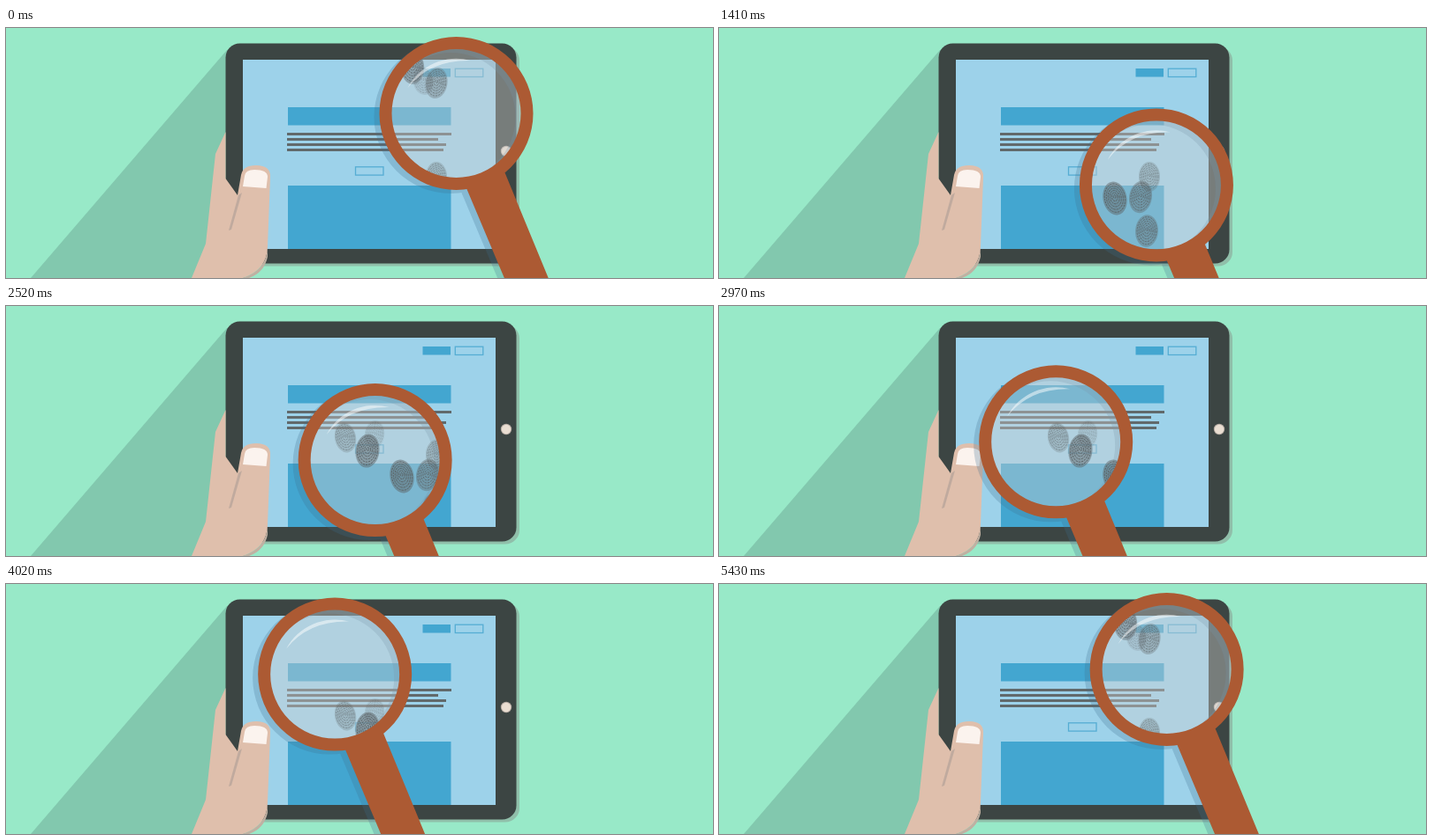
An HTML page with a canvas that plays this animation: 800 by 284 pixels, repeating every 5460 ms.

```html
<!DOCTYPE html>
<html lang="en">
<head>
<meta charset="utf-8">
<title>Magnifier over tablet</title>
<style>
html, body { margin: 0; width: 100%; height: 100%; overflow: hidden; background: #98e9c8; }
canvas { display: block; width: 800px; height: 284px; }
</style>
</head>
<body>
<canvas id="stage" width="800" height="284"></canvas>
<script>
const ctx = document.getElementById('stage').getContext('2d');
const LOOP = 5460, STEP = 30, LEG = LOOP / 3, TAU = Math.PI * 2;
const BLUE = '#43a6d0', SKIN = '#dfbfac', DARK = '#3c4543';

// The lens follows three curves, each at constant speed for a third of the loop
const legs = [
  'M509.500 97C509.500 97 505 193 479 195',
  'M479 195C453 201 332 133 338 112',
  'M338 112C341 97 509.500 97 509.500 97'
].map(d => {
  const path = document.createElementNS('http://www.w3.org/2000/svg', 'path');
  path.setAttribute('d', d);
  return path;
});

function lensAt(t) {
  const leg = legs[Math.floor(t / LEG)];
  return leg.getPointAtLength(leg.getTotalLength() * (t % LEG) / LEG);
}

// Fingerprints: x, y, strength
const prints = [
  [487, 169, .5], [477, 192, .8], [448, 193.5, 1], [484, 230.5, .8],
  [417, 146, .25], [384, 149.5, .5], [409, 164.5, 1], [274, 101, .9],
  [472, 60, .3], [487, 62.5, .65], [460, 45, .9]
];

// Handle and rim as one silhouette around the origin
const rim = new Path2D('M9 79L52 60L144.500 285H95.500Z');
rim.moveTo(87, 0);
rim.arc(0, 0, 87, 0, TAU);
rim.moveTo(73, 0);
rim.arc(0, 0, 73, 0, TAU, true);

function shape(d, color) {
  ctx.fillStyle = color;
  ctx.fill(new Path2D(d));
}

function rect(x, y, w, h, color) {
  ctx.fillStyle = color;
  ctx.fillRect(x, y, w, h);
}

function rounded(x, y, w, h, r, color) {
  ctx.fillStyle = color;
  ctx.beginPath();
  ctx.roundRect(x, y, w, h, r);
  ctx.fill();
}

function ellipse(x, y, rx, ry) {
  ctx.beginPath();
  ctx.ellipse(x, y, rx, ry, 0, 0, TAU);
}

function disc(x, y, r, color) {
  ctx.fillStyle = color;
  ellipse(x, y, r, r);
  ctx.fill();
}

function outline(x, y) {
  ctx.strokeStyle = '#55add3';
  ctx.lineWidth = 1.3;
  ctx.strokeRect(x, y, 31.5, 9.3);
}

function drawTablet() {
  rounded(252, 21, 329, 249.5, 16, '#90bfaa');
  rounded(248.5, 17.5, 329, 250, 16, DARK);
  rect(268, 36, 286, 215, '#9dd2ea');
  rect(471.5, 46, 31.5, 9.5, BLUE);
  outline(508.3, 46.2);
  rect(319, 90, 184.5, 20.5, BLUE);
  [186, 171, 180, 177].forEach((w, i) => rect(318, 119 + i * 6, w, 3, '#61696b'));
  outline(395.5, 157.8);
  rect(319, 179, 184.5, 72, BLUE);
  disc(566, 140, 6.2, '#b5aaa2');
  disc(566, 140, 5.2, '#eaded2');
}

function drawHand() {
  shape('M248.500 118L237 143L226 245L210 284H268Q296 274 296 248L299 170Q300 156 283 156Q268 156 266 167L262 190L248.500 171Z', SKIN);
  shape('M296 246Q297 274 268 284H275Q292 278 296 260Z', '#c0b0a2');
  shape('M263 190L267 187L255 229L252 230Z', '#c0aa9e');
  shape('M268 180L270 168Q271 161 281 161Q296 161 296 169L294.500 182Z', '#fbf3ee');
}

// Stronger prints are larger; ridges are dashed rings
function drawPrint([x, y, strength], i) {
  const w = 10.5 + 3 * strength, h = w * 1.42;
  ctx.save();
  ctx.translate(x, y);
  ctx.rotate(.2 * Math.sin(i * 2.2));
  ctx.globalAlpha = strength;
  ctx.fillStyle = 'rgba(95,103,106,.5)';
  ellipse(0, 0, w, h);
  ctx.fill();
  ctx.strokeStyle = '#596063';
  ctx.lineWidth = .9;
  ctx.setLineDash([2.3, 1]);
  for (let r = .1; r < 1; r += .15) {
    ellipse(0, (r - 1) * h * .12, w * r, h * r);
    ctx.stroke();
  }
  ctx.restore();
}

function drawRim(x, y, color) {
  ctx.save();
  ctx.translate(x, y);
  ctx.fillStyle = color;
  ctx.fill(rim);
  ctx.restore();
}

function drawLens({ x, y }) {
  drawRim(x - 6, y + 4, 'rgba(60,110,140,.25)');

  ctx.save();
  disc(x, y, 74, 'rgba(207,207,208,.4)');
  ctx.clip();
  prints.forEach(drawPrint);
  ctx.translate(x, y);
  shape('M-55 -29A62 62 0 0 1 16 -60Q-30 -61 -55 -29Z', 'rgba(255,255,255,.5)');
  ctx.restore();

  drawRim(x, y, '#ac5a33');
}

function draw(now) {
  const t = Math.floor(now % LOOP / STEP) * STEP;
  rect(0, 0, 800, 284, '#98e9c8');
  shape('M250 25L28 284H270V25Z', '#82c8ae');
  drawTablet();
  drawHand();
  drawLens(lensAt(t));
}

const start = performance.now();
function tick() {
  draw(performance.now() - start);
  requestAnimationFrame(tick);
}
tick();
</script>
</body>
</html>
```
